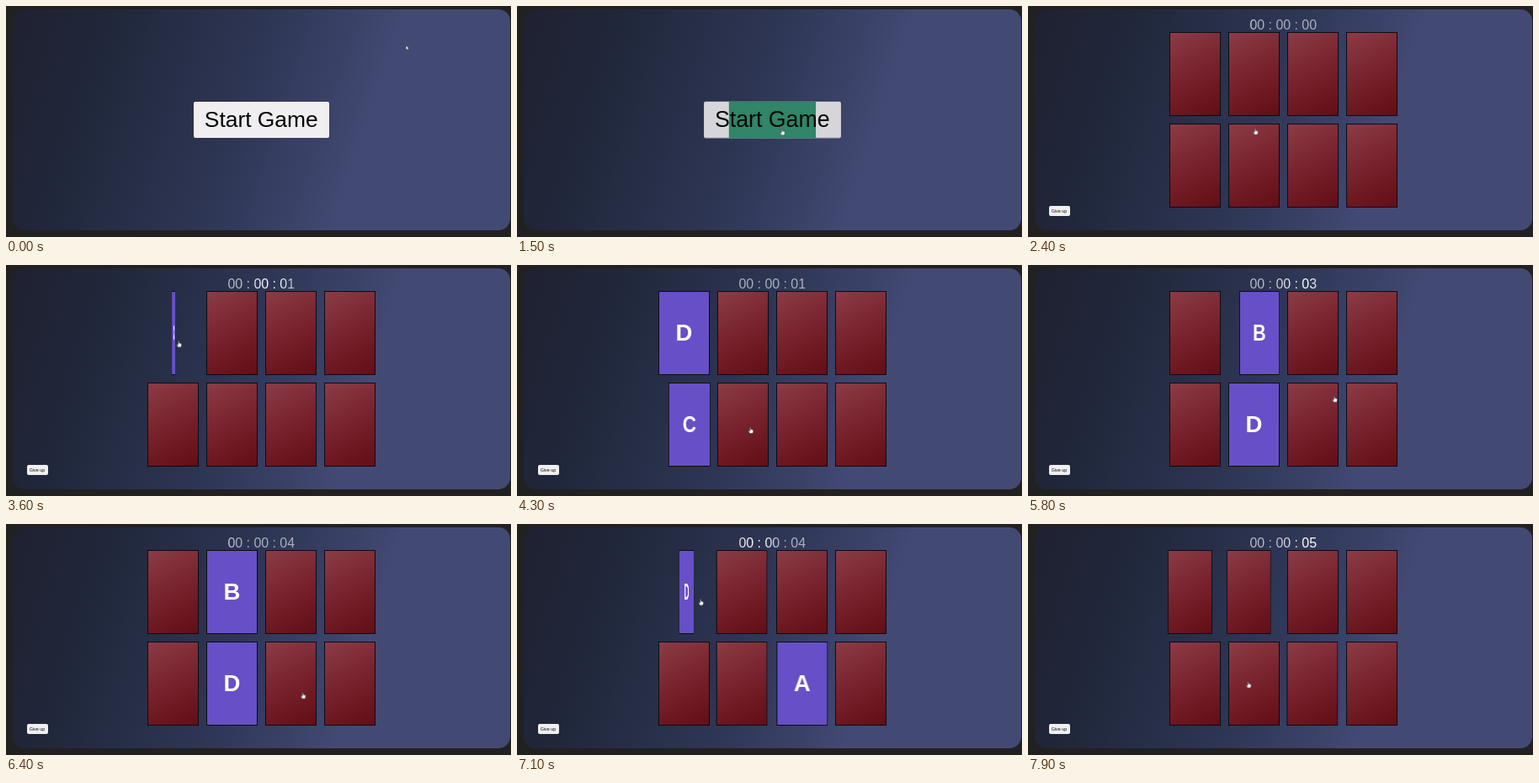
An HTML page that plays this animation: 600x275 px, repeating every 8 s.

```html
<!DOCTYPE html>
<html lang="en">
<head>
<meta charset="utf-8">
<title>Memory game</title>
<style>
@property --p { syntax: "<number>"; inherits: false; initial-value: 0; }

html, body { margin: 0; width: 100%; height: 100%; overflow: hidden; }
body {
  position: relative;
  background: #222122;
  font-family: "Liberation Sans", Arial, sans-serif;
}
body *, body *::before { box-sizing: border-box; position: absolute; }

.panel {
  left: 8px; top: 4px; width: 591px; height: 263px;
  border-radius: 14px;
  background: linear-gradient(108deg, #1f2131 0%, #20273a 17%, #2d3553 44%, #394167 60%, #424a74 69%);
}

/* Start screen */
.start { animation: leave 8s step-end infinite; }
.start-button {
  left: 223px; top: 114px; width: 160.5px; height: 43px;
  border-radius: 2px;
  overflow: hidden;
  background: #f0eef1;
  font-size: 26.4px; line-height: 43px; text-align: center;
  color: #050505;
  animation: hover 8s linear infinite;
}
.start-button::before {
  content: "";
  inset: 0;
  background: #318568;
  transform: scaleX(0);
  animation: fill 8s linear infinite;
}
.start-button span { inset: 0; }

/* Game screen */
.game { visibility: hidden; animation: enter 8s step-end infinite; }
.timer {
  left: 263.5px; top: 13px; width: 82px; height: 20px;
  font-size: 15.9px; line-height: 20px; white-space: pre;
  color: transparent;
  background: linear-gradient(90deg, #b6b9c6 110px, #fff 143px, #fff 155px, #acafbe 175px) no-repeat #b2b5c2;
  background-size: 300px 100%;
  -webkit-background-clip: text;
  background-clip: text;
  animation: shine 2s -1.8s linear infinite;
}
.timer::after { content: "00"; animation: tick 8s step-end infinite; }
.give-up {
  left: 24.5px; top: 238px; width: 25px; height: 12px;
  border-radius: 2px;
  background: #f0eff0;
  font-size: 5.4px; line-height: 12px; text-align: center;
  color: #111;
}
.card {
  width: 61px; height: 100px;
  transform-style: preserve-3d;
  transform-origin: right center;
  transform: translateX(calc(var(--p) * -61px)) rotateY(calc(var(--p) * -180deg));
  animation: 8s ease infinite;
}
.card i {
  inset: 0;
  border: 1px solid #0d0a12;
  backface-visibility: hidden;
  background: linear-gradient(152deg, #8b3c46, #77222c 50%, #620e16);
}
.card b {
  inset: 0;
  border: 1px solid #0d0a12;
  backface-visibility: hidden;
  transform: rotateY(180deg);
  background: #6750c7;
  font-size: 27.5px; line-height: 98px; text-align: center;
  color: #fff;
}
.c1 { left: 168px; } .c2 { left: 238px; } .c3 { left: 308px; } .c4 { left: 378px; }
.r1 { top: 31px; } .r2 { top: 140px; }
.c1.r1 { animation-name: flip-c1r1; }
.c1.r2 { animation-name: flip-c1r2; }
.c2.r1 { animation-name: flip-c2r1; }
.c2.r2 { animation-name: flip-c2r2; }
.c3.r2 { animation-name: flip-c3r2; }

/* Pointer */
.cursor { left: 0; top: 0; animation: move 8s linear infinite; }
.cursor svg { left: 0; top: 0; overflow: visible; }
.arrow { animation: arrow 8s step-end infinite; }
.hand { visibility: hidden; animation: hand 8s step-end infinite; }

@keyframes leave { 0% { visibility: visible } 27.5%, 100% { visibility: hidden } }
@keyframes enter { 0% { visibility: hidden } 27.5%, 100% { visibility: visible } }

@keyframes hover {
  0%, 17.5%, 22.5%, 23.6% { background-color: #f0eef1; box-shadow: none; transform: none }
  18.75%, 20.6%, 25%, 100% { background-color: #d6d6da; box-shadow: 0 0 0 .5px #26364a; transform: scale(1.012) }
}
@keyframes fill {
  0%, 17.5%, 22.5%, 23.6% { transform: scaleX(0) }
  18.75% { transform: scaleX(.63) }
  20%, 20.6%, 25.8%, 100% { transform: scaleX(1) }
}
@keyframes shine {
  from { background-position: -178px 0 }
  to { background-position: -62px 0 }
}
@keyframes tick {
  0% { content: "00" }
  41.875% { content: "01" }
  54.375% { content: "02" }
  66.875% { content: "03" }
  79.375% { content: "04" }
  91.875%, 100% { content: "05" }
}

@keyframes flip-c1r1 {
  0%, 43.1%, 69.4%, 86.6% { --p: 0 }
  49.4%, 63.1%, 92.9% { --p: 1 }
  95.6% { --p: 1; animation-timing-function: ease-in-out }
  100% { --p: 0 }
}
@keyframes flip-c1r2 {
  0%, 50.6%, 69.4%, 100% { --p: 0 }
  56.9%, 63.1% { --p: 1 }
}
@keyframes flip-c2r1 {
  0%, 69.5%, 90% { --p: 0 }
  75.75%, 83.75% { --p: 1 }
  97.85% { --p: 0; animation-timing-function: linear }
  100% { --p: .4 }
}
@keyframes flip-c2r2 {
  0%, 65.2%, 90%, 100% { --p: 0 }
  71.5%, 83.75% { --p: 1 }
}
@keyframes flip-c3r2 {
  0%, 83.1%, 99.6%, 100% { --p: 0 }
  89.4%, 93.4% { --p: 1 }
}

@keyframes move {
  0%, 15.6% { transform: translate(475.3px, 47px) }
  18.75% { transform: translate(315.5px, 146px) }
  21.6% { transform: translate(134px, 214px) }
  24.4% { transform: translate(262px, 148px) }
  30% { transform: translate(269.5px, 145.5px) }
  34% { transform: translate(330px, 182px) }
  37.5%, 39% { transform: translate(373px, 218px) }
  42.8%, 45% { transform: translate(205px, 90px) }
  49.8%, 51% { transform: translate(206px, 188px) }
  53.75% { transform: translate(277px, 193px) }
  58.75% { transform: translate(345px, 198px) }
  63.5%, 65.2% { transform: translate(273px, 180px) }
  66.25% { transform: translate(281.3px, 145.5px) }
  68.75%, 69.6% { transform: translate(284px, 95px) }
  71% { transform: translate(371px, 135px) }
  75% { transform: translate(352px, 190px) }
  80%, 83.2% { transform: translate(352.5px, 200.5px) }
  86.4%, 88% { transform: translate(213px, 88px) }
  94% { transform: translate(252px, 98px) }
  97.85% { transform: translate(262px, 112px) }
  98.75% { transform: translate(261.5px, 187.5px) }
  100% { transform: translate(262px, 192px) }
}
@keyframes arrow {
  0%, 20.4%, 65.6% { visibility: visible }
  17.7%, 23.6%, 67.2%, 100% { visibility: hidden }
}
@keyframes hand {
  0%, 20.4%, 65.6% { visibility: hidden }
  17.7%, 23.6%, 67.2%, 100% { visibility: visible }
}
</style>
</head>
<body>
<div class="panel"></div>

<div class="start">
  <div class="start-button"><span>Start Game</span></div>
</div>

<div class="game">
  <div class="timer" style="position:absolute">00 : 00 : </div>
  <div class="card c1 r1"><i></i><b>D</b></div>
  <div class="card c2 r1"><i></i><b>B</b></div>
  <div class="card c3 r1"><i></i><b>C</b></div>
  <div class="card c4 r1"><i></i><b>A</b></div>
  <div class="card c1 r2"><i></i><b>C</b></div>
  <div class="card c2 r2"><i></i><b>D</b></div>
  <div class="card c3 r2"><i></i><b>A</b></div>
  <div class="card c4 r2"><i></i><b>B</b></div>
  <div class="give-up">Give up</div>
</div>

<div class="cursor">
  <svg class="arrow" width="4" height="6">
    <path d="M0 0V5L1.1 4L1.9 5.8L2.7 5.4L2 3.7H3.5Z" fill="#fff" stroke="#15182a" stroke-width=".35"/>
  </svg>
  <svg class="hand" width="7" height="9">
    <path d="M-.6 .4Q0-.4 .6 .4V2.6L3 3.2Q3.8 3.5 3.7 4.4L3 7.6H-.6L-2.5 4.6Q-2.3 3.7-1.5 4.2L-.6 5Z" fill="#fff" stroke="#15121c" stroke-width=".5"/>
  </svg>
</div>
</body>
</html>
```
